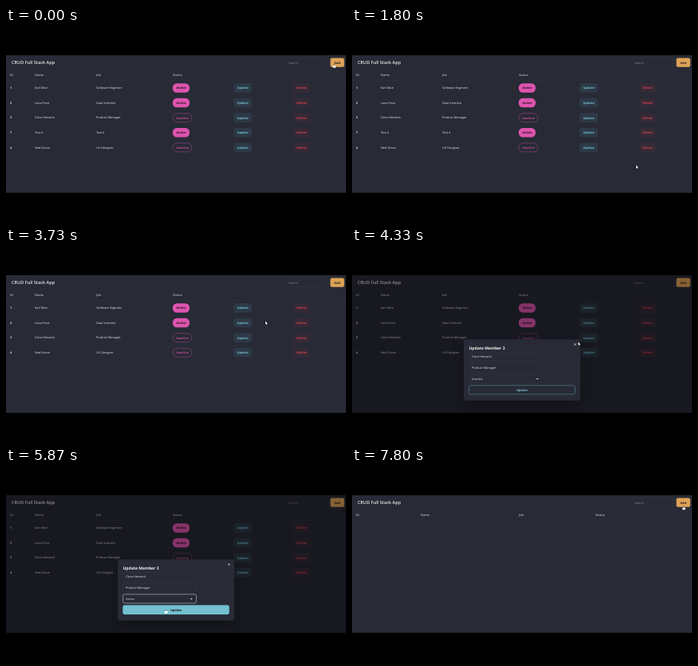
An HTML page with a canvas that plays this animation: 426 px wide and 240 px high, repeating every 8000 ms.

```html
<!DOCTYPE html>
<html lang="en">
<head>
<meta charset="utf-8">
<title>CRUD Full Stack App</title>
<style>
html, body { margin: 0; height: 100%; overflow: hidden; background: #000; }
canvas { display: block; width: 426px; height: 240px; }
</style>
</head>
<body>
<canvas id="stage"></canvas>
<script>
const LOOP = 8000;
const BASE = '#282a36', TEXT = '#e9e9e6', PINK = '#dd55ae', CYAN = '#74c0d0',
      RED = '#cf3f4b', ORANGE = '#dea258', LINE = '#363844', DARK = '#17181f';
const DELETED = 3530, OPENED = 3970, LISTED = 4820, CHOSEN = 5700, BLURRED = 6800,
      SAVED = 7020, CLEARED = 7800;
const ROW = 18.6, BTN = 11.6;

const canvas = document.getElementById('stage');
const dpr = window.devicePixelRatio || 1;
canvas.width = 426 * dpr;
canvas.height = 240 * dpr;
const c = canvas.getContext('2d');

const people = [
  { id: 1, name: 'Karl Moe', job: 'Software Engineer', active: true },
  { id: 2, name: 'Lena Frost', job: 'Data Scientist', active: true },
  { id: 3, name: 'Clara Henwick', job: 'Product Manager' },
  { id: 7, name: 'Test 4', job: 'Test 4', active: true },
  { id: 4, name: 'Ned Grove', job: 'UX Designer' }
];
const edited = people[2];

// Where the pointer rests: time, x, y
const stops = [
  [0, 411, 45], [1800, 356, 171.5], [2600, 369, 130], [DELETED, 369, 130],
  [3730, 325, 91.5], [3950, 297, 111], [4330, 283.5, 117.5], [4750, 200, 163],
  [5200, 199.5, 176.5], [6930, 202, 177.5], [LOOP, 230, 168]
];

const smooth = v => {
  v = Math.min(1, Math.max(0, v));
  return v * v * (3 - 2 * v);
};

function pointerAt(t) {
  if (t >= CLEARED) return { x: 415.5, y: 47.5 };
  const i = stops.findIndex(s => s[0] > t);
  const [t0, x0, y0] = stops[i - 1], [t1, x1, y1] = stops[i];
  const k = smooth((t - t0) / (t1 - t0));
  return { x: x0 + (x1 - x0) * k, y: y0 + (y1 - y0) * k };
}

function box(x, y, w, h, r, fill, stroke, width = 0.6) {
  c.beginPath();
  c.roundRect(x, y, w, h, r);
  if (fill) { c.fillStyle = fill; c.fill(); }
  if (stroke) { c.strokeStyle = stroke; c.lineWidth = width; c.stroke(); }
}

function raised(...args) {
  c.save();
  c.shadowColor = 'rgba(0,0,0,.3)';
  c.shadowBlur = 14 * dpr;
  c.shadowOffsetY = 6 * dpr;
  box(...args);
  c.restore();
}

// y is the vertical middle of the capitals
function text(s, x, y, { size = 3.8, color = TEXT, weight = 500, align = 'left' } = {}) {
  c.font = `${weight} ${size}px "Open Sans", "Noto Sans", sans-serif`;
  c.textAlign = align;
  c.fillStyle = color;
  c.fillText(s, x, y + size * 0.36);
}

const label = (s, x, y, color) => text(s, x, y, { size: 3.9, color, weight: 700, align: 'center' });

function shape(points, fill, stroke) {
  c.beginPath();
  points.forEach(([x, y]) => c.lineTo(x, y));
  c.closePath();
  if (stroke) { c.strokeStyle = stroke; c.lineWidth = 0.6; c.stroke(); }
  c.fillStyle = fill;
  c.fill();
}

const inside = (p, x, y, w, h) => p.x >= x && p.x <= x + w && p.y >= y && p.y <= y + h;

// Each button reports whether the pointer is over it
function button(s, x, y, w, fill, color, p) {
  const hot = Boolean(p) && inside(p, x, y, w, BTN);
  box(x, y, w, BTN, 2, hot ? color : fill);
  label(s, x + w / 2, y + BTN / 2 + 0.1, hot ? DARK : color);
  return hot;
}

function drawRow({ id, name, job, active }, y, p) {
  text(id, 5, y, { weight: 700 });
  text(name, 36, y);
  text(job, 113, y);
  if (active) {
    box(208.8, y - 5.7, 21.2, 11.5, 5.2, PINK);
    label('Active', 219.5, y + 0.1, '#2b1023');
  } else {
    box(209.1, y - 5.4, 23.6, 10.9, 5.2, null, '#b04a8f', 0.5);
    label('Inactive', 220.9, y + 0.1, '#c44f9c');
  }
  const update = button('Update', 285.2, y - 5.8, 22.8, '#2d3946', CYAN, p);
  const remove = button('Delete', 359.8, y - 5.8, 21, '#362a37', RED, p);
  return update || remove;
}

function drawPage(t, p) {
  const empty = t >= CLEARED;
  c.fillStyle = BASE;
  c.fillRect(0, 34, 426, 172);
  text('CRUD Full Stack App', 7, 43.3, { size: 5.55, weight: 600 });
  box(350.3, 37.7, 53.5, 11, 2, null, LINE, 0.5);
  text('Search', 354, 43.2, { color: '#85868c' });
  box(406.4, 37.4, 17.4, 11.4, 2, ORANGE);
  label('Add', 415.1, 43.2, '#2a2019');

  const cols = empty ? [5, 86, 209, 305] : [5, 36, 113, 209];
  ['ID', 'Name', 'Job', 'Status'].forEach((s, i) =>
    text(s, cols[i], 59, { color: '#b9babd', weight: 600 }));
  c.fillStyle = '#30323e';
  c.fillRect(0, 65.2, 426, 0.5);

  let hot = Boolean(p) && inside(p, 406, 37, 18, 12);
  if (empty) return hot;
  people.filter(r => t < DELETED || r.id !== 7).forEach((r, i) => {
    const row = r === edited ? { ...r, active: t >= SAVED } : r;
    hot = drawRow(row, 74.9 + i * ROW, p) || hot;
  });
  return hot;
}

function drawModal(t, p) {
  const listed = t >= LISTED && t < CHOSEN;
  raised(140, 114.3, 146, 76.4, 3, BASE);
  text(`Update Member ${edited.id}`, 146.5, 125.2, { size: 5.05, color: '#f4f4f0', weight: 700 });
  label('✕', 279.4, 121, TEXT);
  [edited.name, edited.job, t < CHOSEN ? 'Inactive' : 'Active'].forEach((s, i) => {
    const y = 136.1 + i * 13.7;
    box(146.6, y - 5.4, 91.4, 10.9, 2, null, LINE, 0.5);
    text(s, 150, y);
  });
  shape([[230.7, 162.9], [233.7, 162.9], [232.2, 164.6]], TEXT);
  if (t >= LISTED && t < BLURRED) box(146.5, 157.9, 92, 11.1, 2, null, '#a9aaaf', 0.7);

  box(146.7, 171.8, 132.7, 11, 2, null, '#5b9aaa', 0.5);
  const hot = button('Update', 146.4, 171.5, 133.2, BASE + '00', CYAN, listed ? null : p);

  if (listed) {
    raised(146.7, 169.6, 91, 17.8, 1, BASE);
    box(148, p.y < 171 ? 179 : 171, 88.5, 7.2, 0.8, '#454752');
    text('Active', 149.5, 174.5);
    text('Inactive', 149.5, 182.6);
  }
  return hot;
}

function drawPointer({ x, y }, hand) {
  c.save();
  c.translate(x, y);
  if (hand) {
    box(-0.5, 0, 1, 3, 0.5, '#fff', '#222', 0.4);
    box(-1.6, 1.9, 3.8, 2.9, 1, '#fff');
  } else {
    shape([[0, 0], [0, 4], [0.9, 3.2], [1.6, 4.6], [2.2, 4.3], [1.6, 3], [2.8, 2.9]], '#fff', '#111');
  }
  c.restore();
}

function draw(t) {
  const p = pointerAt(t);
  const open = t >= OPENED && t < SAVED;
  const show = smooth((t - OPENED) / 220) * (1 - smooth((t - SAVED) / 220));
  c.setTransform(dpr, 0, 0, dpr, 0, 0);
  c.textRendering = 'geometricPrecision';
  c.fillStyle = '#000';
  c.fillRect(0, 0, 426, 240);
  let hot = drawPage(t, open ? null : p);

  if (show > 0) {
    const scale = 0.95 + 0.05 * show;
    c.fillStyle = `rgba(0,0,0,${0.4 * show})`;
    c.fillRect(0, 34, 426, 172);
    c.save();
    c.globalAlpha = show;
    c.translate(213, 152.5);
    c.scale(scale, scale);
    c.translate(-213, -152.5);
    hot = drawModal(t, p) || hot;
    c.restore();
  }
  drawPointer(p, hot);
}

function tick(now) {
  draw(now % LOOP);
  requestAnimationFrame(tick);
}
requestAnimationFrame(tick);
</script>
</body>
</html>
```
